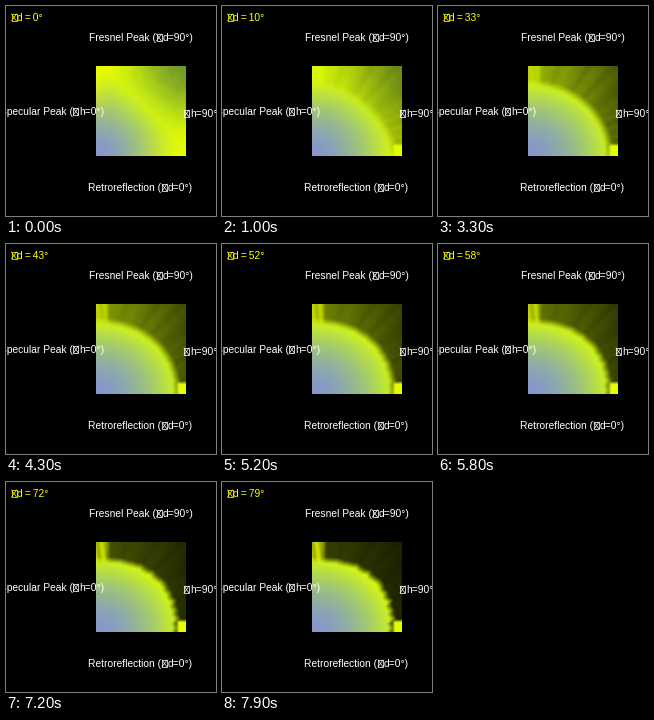
Write a matplotlib script that moves like this. It is 210 px wide and 210 px high and loops after 8000 ms.

```python
import numpy as np
import matplotlib.pyplot as plt
from matplotlib.animation import FuncAnimation
from matplotlib.patches import Rectangle

SIZE, FRAMES = 210, 80
X0, Y0, N = 90, 60, 90
FONT = dict(family=["Liberation Sans", "DejaVu Sans"], fontsize=7.4, va="baseline")

BLUE = np.array([135, 150, 205.0])
LIME = np.array([212, 248, 18.0])
YELLOW = np.array([232, 252, 0.0])
GREEN = np.array([115, 155, 40.0])
OLIVE = np.array([185, 220, 8.0])
FALLOFF = np.array([2.4, 1.6, 1.7])  # per-channel speed from blue to lime

u, v = np.meshgrid((np.arange(N) + 0.5) / N, 1 - (np.arange(N) + 0.5) / N)
angle = np.arctan2(v, u) * 2 / np.pi

rng = np.random.default_rng(4)
rays = np.interp(angle, np.linspace(0, 1, 30), rng.uniform(-1, 1, 30))
patches = np.kron(rng.uniform(-1, 1, (15, 15)), np.ones((6, 6)))


def smooth(x):
    x = np.clip(x, 0, 1)
    return x * x * (3 - 2 * x)


def mix(a, b, w):
    w = np.asarray(w)[..., None]
    return a * (1 - w) + b * w


def glow(r):
    """Blue in the middle, lime at r = 1."""
    return BLUE + (LIME - BLUE) * np.clip(r, 0, 1)[..., None] ** FALLOFF


def radius(a, b, n):
    return ((u / a) ** n + (v / b) ** n) ** (1 / n)


def diagonal_slice():
    s = u + v
    img = mix(glow(s / 1.1), GREEN, smooth((s - 0.9) / 1.1))
    img = mix(img, YELLOW, np.clip(1.3 * np.abs(u - v) ** 2.2, 0, 0.95))
    return img + (4 * patches * smooth(s - 0.9))[..., None]


START = diagonal_slice()
INSIDE = glow(radius(0.93, 0.82, 2))


def brdf_slice(phi):
    k = phi / (FRAMES - 1)
    rho = radius(0.89, 0.8, 1.65 + 0.95 * k)

    shade = (1.25 - 0.55 * u - 0.15 * u * v + 0.07 * rays) * (1 - 0.75 * k)
    outside = OLIVE * shade[..., None]
    streak = 0.85 + 0.15 * np.sin(70 * u + 9 * v + 0.1 * phi)
    left = smooth((0.17 - u) / 0.08) * streak
    corner = smooth((u - 0.88) / 0.05) * smooth((0.15 - v) / 0.05)
    outside = mix(outside, YELLOW, np.clip((0.3 + 0.55 * k) * left + corner, 0, 1))

    jag = 0.03 * k ** 2 * u * rays
    img = mix(INSIDE, outside, smooth((rho + jag - 0.94) / (0.17 - 0.05 * k)))
    img = mix(START, img, smooth(phi / 18))
    return np.clip(img, 0, 255).astype(np.uint8)


fig = plt.figure(figsize=(2.1, 2.1), dpi=100, facecolor="black")
ax = fig.add_axes([0, 0, 1, 1])
ax.axis("off")
image = ax.imshow(brdf_slice(0), extent=(X0, X0 + N, Y0 + N, Y0),
                  interpolation="nearest", aspect="auto")
ax.set(xlim=(0, SIZE), ylim=(SIZE, 0))


def label(x, y, before, after, color="white"):
    """Text with a crossed box, left edge at x, in place of the Greek letter."""
    ax.text(x, y, before, color=color, ha="right", **FONT)
    left, right, top = x + 0.5, x + 5.5, y - 7
    ax.add_patch(Rectangle((left, top), right - left, 7, fill=False, ec=color, lw=0.55))
    ax.plot([left, right], [top, y], color=color, lw=0.5)
    ax.plot([left, right], [y, top], color=color, lw=0.5)
    return ax.text(x + 6.3, y, after, color=color, ha="left", **FONT)


label(150, 35, "Fresnel Peak (", "d=90°)")
label(66.8, 109, "Specular Peak (", "h=0°)")
label(177.5, 111, "", "h=90°")
label(155.5, 185, "Retroreflection (", "d=0°)")
counter = label(5, 15, "", "", "yellow")


def update(i):
    image.set_data(brdf_slice(i))
    counter.set_text(f"d\u2009=\u2009{i}°")
    return image, counter


anim = FuncAnimation(fig, update, frames=FRAMES, interval=100, repeat=True, repeat_delay=0)
plt.show()
```
